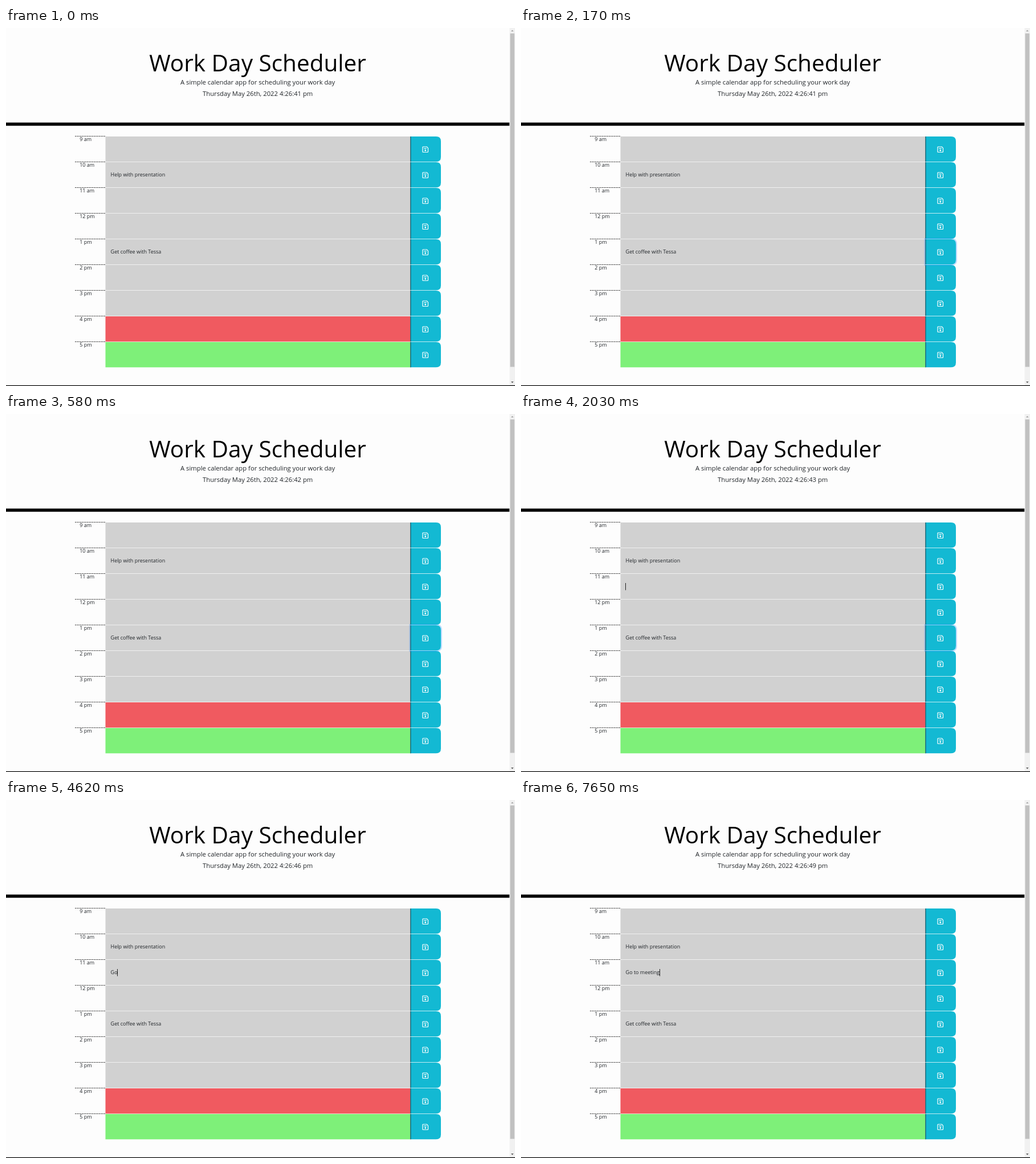
Write an HTML page that moves like this. It is 893 by 627 pixels and loops after 8000 ms.

```html
<!DOCTYPE html>
<html lang="en">
<head>
<meta charset="utf-8">
<title>Work Day Scheduler</title>
<style>
  html, body { margin: 0; width: 100%; height: 100%; overflow: hidden; background: #fdfdfd; }
  svg { display: block; }
  text { font-family: "Open Sans", sans-serif; font-size: 9.01px; fill: #212529; white-space: pre; }
  .mid { text-anchor: middle; font-size: 11.25px; }
  .title { font-size: 40.5px; fill: #000; }
  .past { fill: #d1d1d1; }
  .present { fill: #f05a60; }
  .future { fill: #7ef079; }
  .save { fill: #13b9d3; }
  .dash { stroke: #333; stroke-dasharray: 2 1; }
  .edge { stroke: #123c46; }
  .icon { fill: none; stroke: #fff; stroke-width: 1.2; stroke-linejoin: round; }
</style>
</head>
<body>
<svg width="893" height="627" viewBox="0 0 893 627">
  <text class="mid title" x="441.5" y="76">Work Day Scheduler</text>
  <text class="mid" x="441.7" y="98.5">A simple calendar app for scheduling your work day</text>
  <text class="mid" id="clock" x="441.7" y="118.5"></text>
  <rect y="165.6" width="883.5" height="5.6"/>
  <g id="rows"></g>
  <text id="entry" x="183.6" y="305.4"></text>
  <path id="caret" stroke="#222" d="M0 296V308.5"/>
  <path id="ring" fill="none" stroke="#007bff" stroke-opacity=".25" stroke-width="2"/>
  <g id="hand">
    <path fill="#fff" stroke="#444" stroke-width=".8" stroke-linejoin="round"
      d="M-1.3 1V-5Q-.3-6.6.7-5V-1.2L3.8-.5Q4.8-.1 4.7 1L4 6.3H-1.4L-4.2 2Q-4-.1-2.4.6Z"/>
  </g>
  <rect x="883.5" width="9.5" height="626" fill="#f1f1f1"/>
  <rect x="884.5" y="9.5" width="7.5" height="584" fill="#c1c1c1"/>
  <path fill="#a3a3a3" d="M886 6l2.3-2.6 2.3 2.6z"/>
  <path fill="#505050" d="M886 619.2l2.3 2.6 2.3-2.6z"/>
  <rect y="625.8" width="893" height="1.2"/>
</svg>
<script>
const LOOP = 8000, TOP = 190, PITCH = 45, ROW_H = 44.3;
const $ = id => document.getElementById(id);
const clock = $('clock'), entry = $('entry'), caret = $('caret'), ring = $('ring'), hand = $('hand');

const hours = ['9 am', '10 am', '11 am', '12 pm', '1 pm', '2 pm', '3 pm', '4 pm', '5 pm'];
const notes = { 1: 'Help with presentation', 4: 'Get coffee with Tessa' };

// box with only its right corners rounded
const tab = (x, y, w, h, r) =>
  `M${x} ${y}h${w - r}q${r} 0 ${r} ${r}v${h - 2 * r}q0 ${r} ${-r} ${r}h${r - w}z`;

const row = (hour, i) => {
  const y = TOP + i * PITCH;
  const state = i < 7 ? 'past' : i < 8 ? 'present' : 'future';
  return `<path class="dash" d="M121 ${y - .5}H174.5"/>
    <text x="129.2" y="${y + 8.3}">${hour}</text>
    <rect class="${state}" x="174.5" y="${y}" width="535" height="${ROW_H}"/>
    <text x="183.6" y="${y + 70.4 - PITCH}">${notes[i] || ''}</text>
    <path class="save" d="${tab(709.5, y, 53.5, ROW_H, 8.4)}"/>
    <path class="edge" d="M709.9 ${y}v${ROW_H}"/>
    <g class="icon" transform="translate(731 ${y + 18})">
      <path d="M1 0H7.2L9.5 2.3V8.5Q9.5 9.5 8.5 9.5H1Q0 9.5 0 8.5V1Q0 0 1 0ZM2.3 2.8H6.8"/>
      <circle cx="4.75" cy="6.2" r=".9"/>
    </g>`;
};
$('rows').innerHTML = hours.map(row).join('');
ring.setAttribute('d', tab(708.5, TOP + 4 * PITCH - 1, 55.5, ROW_H + 2, 9.4));

const phrase = 'Go to meeting';
const keys = [4330, 4620, 4780, 5630, 5750, 5980, 6770, 6920, 7100, 7270, 7350, 7500, 7650];
const ticks = [360, 1390, 2400, 3400, 4400, 5400, 6400, 7400];
const FOCUS = 2030, BLINK = 535;

const passed = (list, t) => list.filter(at => at <= t).length;
const clamp = v => Math.max(0, Math.min(1, v));
const ease = v => v * v * (3 - 2 * v);
const show = (el, on) => el.setAttribute('visibility', on ? 'visible' : 'hidden');

function draw(t) {
  clock.textContent = `Thursday May 26th, 2022 4:26:${41 + passed(ticks, t)} pm`;

  const typed = passed(keys, t);
  entry.textContent = phrase.slice(0, typed);
  const since = t - (typed ? keys[typed - 1] : FOCUS);
  show(caret, since >= 0 && Math.floor(since / BLINK) % 2 === 0);
  const width = typed ? entry.getComputedTextLength() : 0;
  caret.setAttribute('transform', `translate(${Math.floor(183.9 + width) + .5} 0)`);

  // focus glow on the 1 pm button
  ring.setAttribute('opacity', ease(clamp((t - 20) / 150)) - ease(clamp((t - FOCUS) / 150)));

  const step = Math.floor((t - 390) / 30);
  show(hand, step >= 0 && step < 3);
  hand.setAttribute('transform', `translate(${724 - 8 * step} ${300 - 49 * step})`);
}

const start = performance.now();
function frame() {
  draw((performance.now() - start) % LOOP);
  requestAnimationFrame(frame);
}
frame();
</script>
</body>
</html>
```
